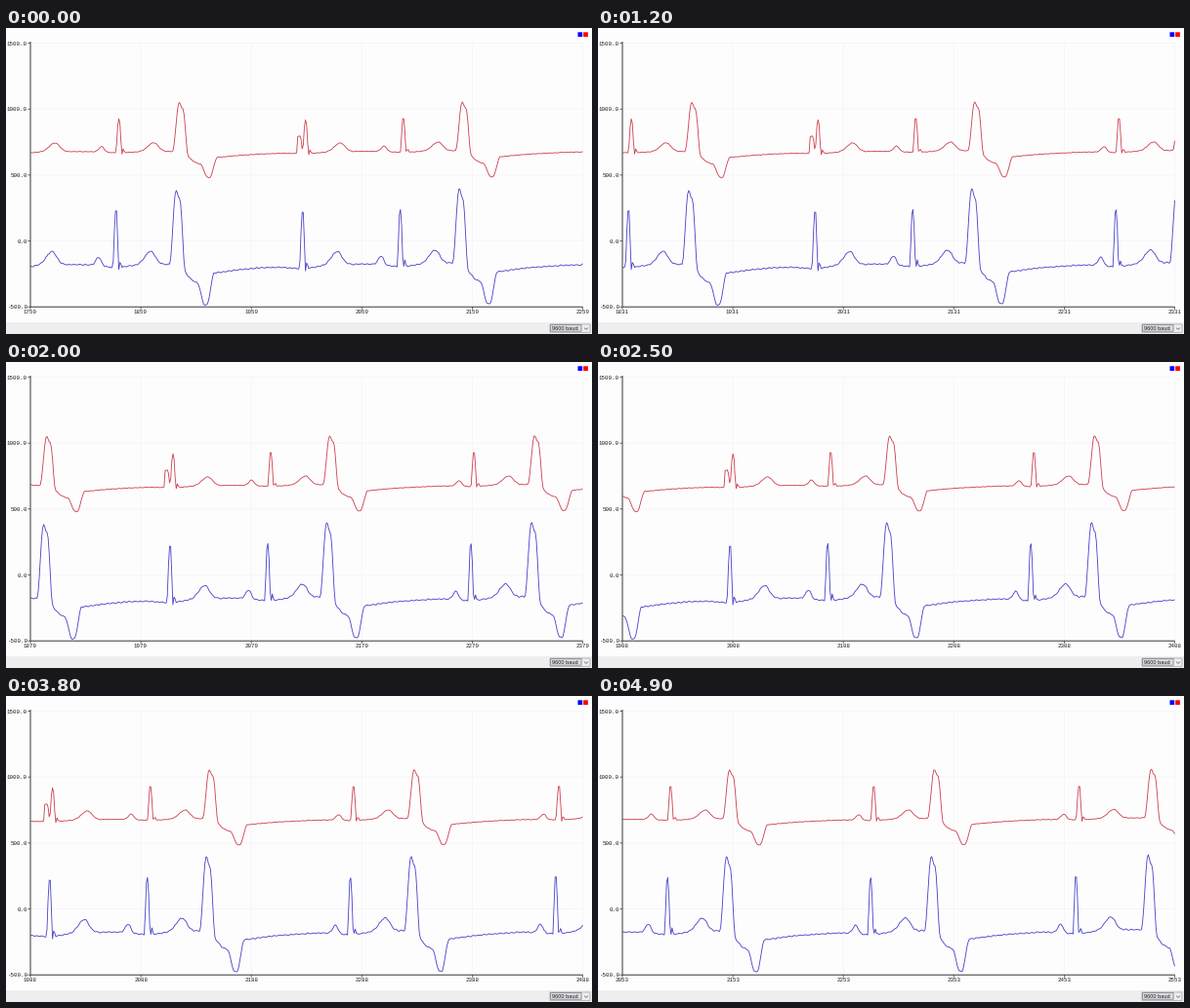
These frames come from a looping animation (600 px wide and 314 px high, 5000 ms). A matplotlib script:

```python
import numpy as np
import matplotlib.pyplot as plt
from matplotlib.animation import FuncAnimation
from matplotlib.patches import Rectangle

W, H, DPI = 600, 314, 100
FRAMES, INTERVAL = 50, 100
PX = 72 / DPI
LEFT, RIGHT, TOP, BOTTOM = 25, 590.5, 15.5, 286.2
SPAN, FIRST, LAST = 500, 1759, 2053
STEP = (RIGHT - LEFT) / SPAN
PAPER, GRID, AXIS, INK = "#fefdfe", "#f6f4f7", "#3c3c3c", "#1c1c1c"

# Heartbeat positions along the recording, in pixels of the first view.
SPIKES = [14.6, 115.6, 306.7, 406.8, 614.8, 825]
P_WAVES = [98, 387.3, 599.6, 809.5]
WIDE_BEATS = [177.5, 467.3, 677, 899]


def bump(t, rise, fall=None):
    return np.exp(-.5 * (t / np.where(t < 0, rise, fall or rise)) ** 2)


def smooth(t, start, end):
    k = np.clip((t - start) / (end - start), 0, 1)
    return k * k * (3 - 2 * k)


def spike(t):
    """Narrow peak with an undershoot and a small rebound."""
    peak = np.clip(1.35 * (1 - np.abs(t) / 2.9), 0, 1)
    return peak - .06 * bump(t - 3, .6) + .11 * bump(t - 4.5, .7)


def hump(t):
    """Tall rounded peak with a shoulder on its right side."""
    return smooth(t, -7, -.3) * (1 - .12 * smooth(t, 0, 3)) * (1 - smooth(t, 3.5, 9))


def slump(t, sag, pit):
    """Dip after a hump: a sag, a deeper pit and a slow recovery."""
    release = smooth(t, 31, 39)
    sagging = sag * (1 - np.exp(-np.maximum(t - 6, 0) / 7.5)) * (1 - .58 * release)
    recovery = np.exp(-np.maximum(t - 40, 0) / 58)
    return sagging * recovery + pit * smooth(t, 21.5, 29) * (1 - release)


def trace(u, start, end, sway, p, spike_height, t_wave, wide, sag, pit, ripple):
    y = start + (end - start) * (u - LEFT) / 865
    y += ripple * wobble
    for at in SPIKES:
        y += sway * bump(u - at, 14)
        y -= spike_height * spike(u - at) + t_wave * bump(u - at - 35.7, 6, 4.6)
    for at in P_WAVES:
        y -= p * bump(u - at, 2.9, 2.5)
    for at in WIDE_BEATS:
        y += slump(u - at, sag, pit) - wide * hump(u - at)
    return y


samples = np.arange(FIRST, LAST + SPAN + 1)
u = LEFT + (samples - FIRST) * STEP
rng = np.random.default_rng(4)
wobble = np.sin(samples * 2 * np.pi / 5) + rng.normal(0, .5, len(samples))
red = trace(u, 127, 124.7, 1.2, p=5.7, spike_height=34.5, t_wave=9, wide=50,
            sag=15, pit=12.5, ripple=.18)
blue = trace(u + 3.1, 243, 239.2, 3, p=9, spike_height=58, t_wave=13.5, wide=76,
             sag=22, pit=21, ripple=.4)
# A short square glitch comes before one red spike.
red -= 18 * smooth(u, 297.4, 298.8) * (1 - smooth(u, 301.2, 304.3))

fig = plt.figure(figsize=(W / DPI, H / DPI), dpi=DPI, facecolor=PAPER)
ax = fig.add_axes([0, 0, 1, 1])
ax.set(xlim=(0, W), ylim=(H, 0))
ax.axis("off")


def line(xs, ys, color, width=1.0, z=2):
    return ax.plot(xs, ys, color=color, lw=width * PX, zorder=z,
                   solid_capstyle="butt", snap=False)[0]


def box(x, y, w, h, color, edge="none"):
    ax.add_patch(Rectangle((x, y), w, h, fc=color, ec=edge, lw=.7 * PX,
                           zorder=3, snap=False))


def label(x, y, text, ha, size=5.8, font="Liberation Mono"):
    return ax.text(x, y, text, ha=ha, va="center_baseline", color=INK, zorder=5,
                   fontsize=size * PX, family=font)


ticks_x = np.linspace(LEFT, RIGHT, 6)
ticks_y = np.linspace(TOP, BOTTOM, 5)
for x in ticks_x:
    line([x, x], [TOP, BOTTOM], GRID, z=1)
    line([x, x], [BOTTOM, BOTTOM + 2.5], AXIS, .8)
for y, value in zip(ticks_y, range(1500, -501, -500)):
    line([LEFT, RIGHT], [y, y], GRID, z=1)
    line([LEFT - 2.5, LEFT], [y, y], AXIS, .8)
    label(22, y, f"{value:.1f}", "right")
line([LEFT, LEFT], [TOP - 1.5, BOTTOM], AXIS)
line([LEFT, RIGHT], [BOTTOM, BOTTOM], AXIS)
x_labels = [label(x, 291.2, "", "center") for x in ticks_x]

box(585.5, 4.3, 4.7, 4.8, "#0000ff")
box(591.2, 4.3, 4.7, 4.8, "#ff0000")
box(0, 302, W, 12, "#eeeeee")
box(557, 304, 41, 8.3, "#eeeeee", "#a0a0a4")
box(557.6, 304.6, 31.5, 6.6, "#dcdae2", "#77757e")
label(558.6, 308.3, "9600 baud", "left", 5.6, "Liberation Sans")
line([592, 594, 596], [307.6, 309.4, 307.6], "#777777", .8, 4)

red_line = line([], [], "#cc3d4c", .85, 3)
blue_line = line([], [], "#4540c8", .85, 3)


def update(frame):
    start = int(round(np.interp(frame, [0, 7, 16, 25, 33, 44, 49],
                                [FIRST, 1800, 1855, 1908, 1958, 2024, LAST])))
    view = slice(start - FIRST, start - FIRST + SPAN + 1)
    x = LEFT + np.arange(SPAN + 1) * STEP
    red_line.set_data(x, red[view])
    blue_line.set_data(x, blue[view])
    for i, text in enumerate(x_labels):
        text.set_text(str(start + 100 * i))
    return [red_line, blue_line, *x_labels]


anim = FuncAnimation(fig, update, frames=FRAMES, interval=INTERVAL,
                     repeat=True, repeat_delay=0, blit=False)
plt.show()
```
